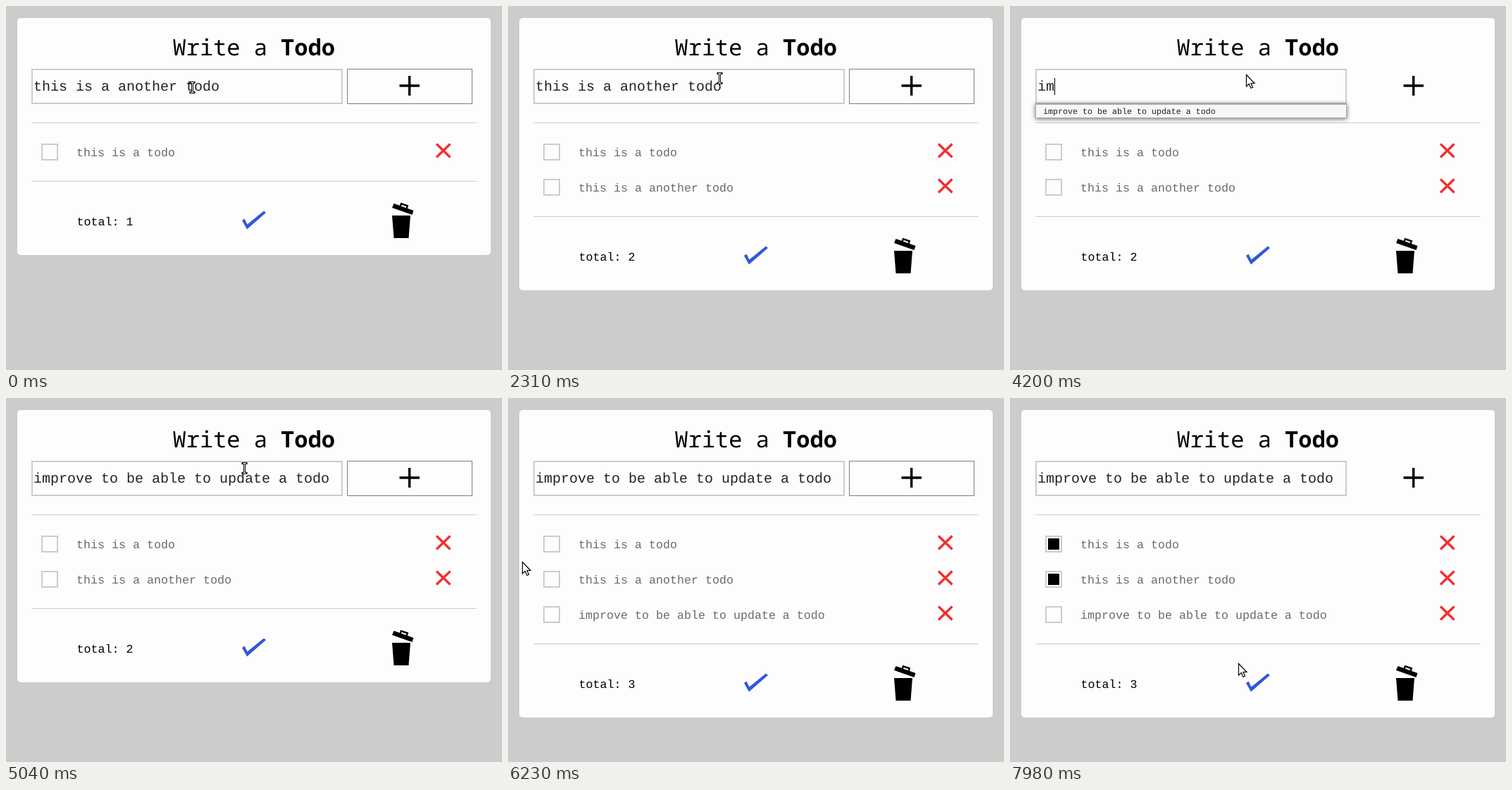
These frames come from a looping animation (704x516 px, 8000 ms). An HTML page:

```html
<!DOCTYPE html>
<html lang="en">
<head>
<meta charset="utf-8">
<title>Todo list</title>
<style>
  html, body { margin: 0; width: 100%; height: 100%; overflow: hidden; background: #ccc; }
  svg { display: block; width: 704px; height: 516px; }
  text { font: 16.667px "Liberation Mono", monospace; white-space: pre; text-rendering: geometricPrecision; }
  .title { font: 32px "Noto Sans Mono", monospace; }
  .title tspan { font-weight: 700; }
  #entry { font-size: 20px; }
  .item text { fill: #6b6b6b; }
  .box { fill: none; stroke: #ccc; stroke-width: 2; }
  .rule { stroke: #ccc; }
  .cross { stroke: #f03030; stroke-width: 3.4; }
  #popup { filter: drop-shadow(0 1px 3px rgba(0, 0, 0, .6)); }
  #popup text { font-size: 11.667px; }
</style>
</head>
<body>
<svg viewBox="0 0 704 516">
  <rect width="704" height="516" fill="#ccc"/>
  <rect id="card" x="16" y="17" width="672" rx="5" fill="#fdfdfd"/>
  <text class="title" x="236.5" y="70">Write a <tspan>Todo</tspan></text>

  <rect class="box" x="37" y="90" width="440" height="48"/>
  <rect id="selection" x="39" y="102" width="264" height="24" fill="#4a90d9"/>
  <text id="entry" x="39" y="120"></text>
  <rect id="caret" y="102" width="1" height="24"/>

  <rect id="focus" x="484.5" y="89.5" width="177" height="49" fill="none" stroke="#000" stroke-dasharray="1 1"/>
  <path d="M558.5 113H587M572.7 99V127" stroke="#000" stroke-width="3.4"/>
  <path class="rule" d="M36 165.5H668"/>
  <g id="list"></g>

  <g id="footer">
    <path class="rule" d="M36 248.5H668"/>
    <text id="total" x="100.5" y="311"></text>
    <path d="M335 304L338.500 301.500L342.500 309.500L366 290.500L369 293L342 316.500Z" fill="#3158d8"/>
    <path d="M548 297H574L571.500 329H550.500ZM550.500 280L578.500 290L576.500 296L548 286Z"/>
    <path d="M559.500 284L561 280.300L569.800 283.300L568.500 287.500" fill="none" stroke="#000" stroke-width="2.4"/>
  </g>

  <g id="popup">
    <rect x="36" y="138" width="442" height="21" fill="#aaa"/>
    <rect id="option" x="37" y="140" width="440" height="18"/>
    <text id="hint" x="47" y="153"></text>
  </g>

  <g id="beam" fill="none" stroke-linecap="square">
    <path d="M-2.500 -7H2.500M0 -7V7M-2.500 7H2.500" stroke="#000" stroke-width="3"/>
    <path d="M-2 -7H2M0 -7V7M-2 7H2" stroke="#fff"/>
  </g>
  <path id="arrow" d="M.5 .5V17L4.300 13.500L7 19.500L9.600 18.300L7 12.500H12Z" fill="#fff" stroke="#000" stroke-width="1.2"/>
</svg>
<script>
const LOOP = 8000, STEP = 70, ROW = 50;
const $ = id => document.getElementById(id);
const todos = ["this is a todo", "this is a another todo", "improve to be able to update a todo"];
const addedAt = [0, 630, 5320];
const checkedAt = [7210, 6790, Infinity];
const hovered = [[7000, 7490], [6650, 6960], [7530, 7600]];

// Pointer path: time, x, y
const pointer = [
  [0, 264, 115], [2240, 264, 115], [2310, 300, 102], [2380, 321, 100], [2520, 338, 99],
  [5670, 338, 99], [5740, 339, 97], [5810, 341, 94], [5880, 341, 94],
  [5950, 325, 84], [6020, 236, 116], [6160, 50, 212], [6230, 20, 232],
  [6580, 32, 249], [6720, 52, 257], [6860, 58, 255], [6930, 59, 241],
  [7000, 60, 220], [7070, 61, 209], [7350, 62, 206], [7420, 78, 218],
  [7560, 190, 298], [7700, 266, 345], [7980, 324, 376]
];

$("list").innerHTML = todos.map((todo, i) => `
  <g class="item" transform="translate(0 ${i * ROW})">
    <rect class="shade" x="36" y="182" width="632" height="50" fill="#ededed"/>
    <rect class="box" x="51" y="196" width="22" height="22"/>
    <rect class="mark" x="54" y="199" width="16" height="16"/>
    <text x="100" y="213">${todo}</text>
    <path class="cross" d="M611 195.500L630.500 214.500M630.500 195.500L611 214.500"/>
  </g>`).join("");
const items = [...document.querySelectorAll(".item")];
$("hint").textContent = todos[2];

const show = (el, on) => el.style.display = on ? "" : "none";
const during = (t, from, to) => t >= from && t < to;
const fade = (t, start) => Math.min(1, Math.max(0, (t - start) / 310));

function pointerAt(t) {
  const next = pointer.findIndex(key => key[0] > t);
  if (next < 0) return pointer.at(-1).slice(1);
  const [t0, x0, y0] = pointer[next - 1], [t1, x1, y1] = pointer[next];
  const k = (t - t0) / (t1 - t0);
  return [x0 + (x1 - x0) * k, y0 + (y1 - y0) * k];
}

function entryAt(t) {
  if (t < 4060) return todos[1];
  if (t < 4200) return "i";
  return t < 5040 ? "im" : todos[2];
}

function draw(t) {
  const count = addedAt.filter(time => t >= time).length;
  $("card").setAttribute("height", 286 + count * ROW);
  $("footer").setAttribute("transform", `translate(0 ${(count - 1) * ROW})`);
  $("total").textContent = "total: " + count;

  items.forEach((item, i) => {
    const [enter, leave] = hovered[i];
    show(item, i < count);
    item.querySelector(".shade").style.opacity = Math.max(0, fade(Math.min(t, leave), enter) - fade(t, leave));
    item.querySelector(".mark").style.opacity = fade(t, checkedAt[i]);
  });

  const entry = entryAt(t), selected = during(t, 3360, 4060);
  $("entry").textContent = entry;
  $("entry").setAttribute("fill", selected ? "#fff" : "#222");
  $("caret").setAttribute("x", 39 + entry.length * 12);
  show($("selection"), selected);
  show($("caret"), during(t, 2660, 5040) && !selected);
  show($("focus"), t < 2660 || during(t, 5040, 6790));

  const picked = t >= 4900;
  show($("popup"), during(t, 4130, 5040));
  $("option").setAttribute("fill", picked ? "#4a90d9" : "#f7f7f7");
  $("hint").setAttribute("fill", picked ? "#fff" : "#222");

  const overPopup = during(t, 4130, 5040), isArrow = overPopup || t >= 5950;
  const [x, y] = overPopup ? [335, 97] : pointerAt(t);
  const cursor = isArrow ? $("arrow") : $("beam");
  cursor.setAttribute("transform", `translate(${Math.round(x) + (isArrow ? 0 : .5)} ${Math.round(y) + (isArrow ? 0 : .5)})`);
  show($("arrow"), isArrow);
  show($("beam"), !isArrow);
}

function tick() {
  draw(Math.floor(performance.now() % LOOP / STEP) * STEP);
  requestAnimationFrame(tick);
}
tick();
</script>
</body>
</html>
```
